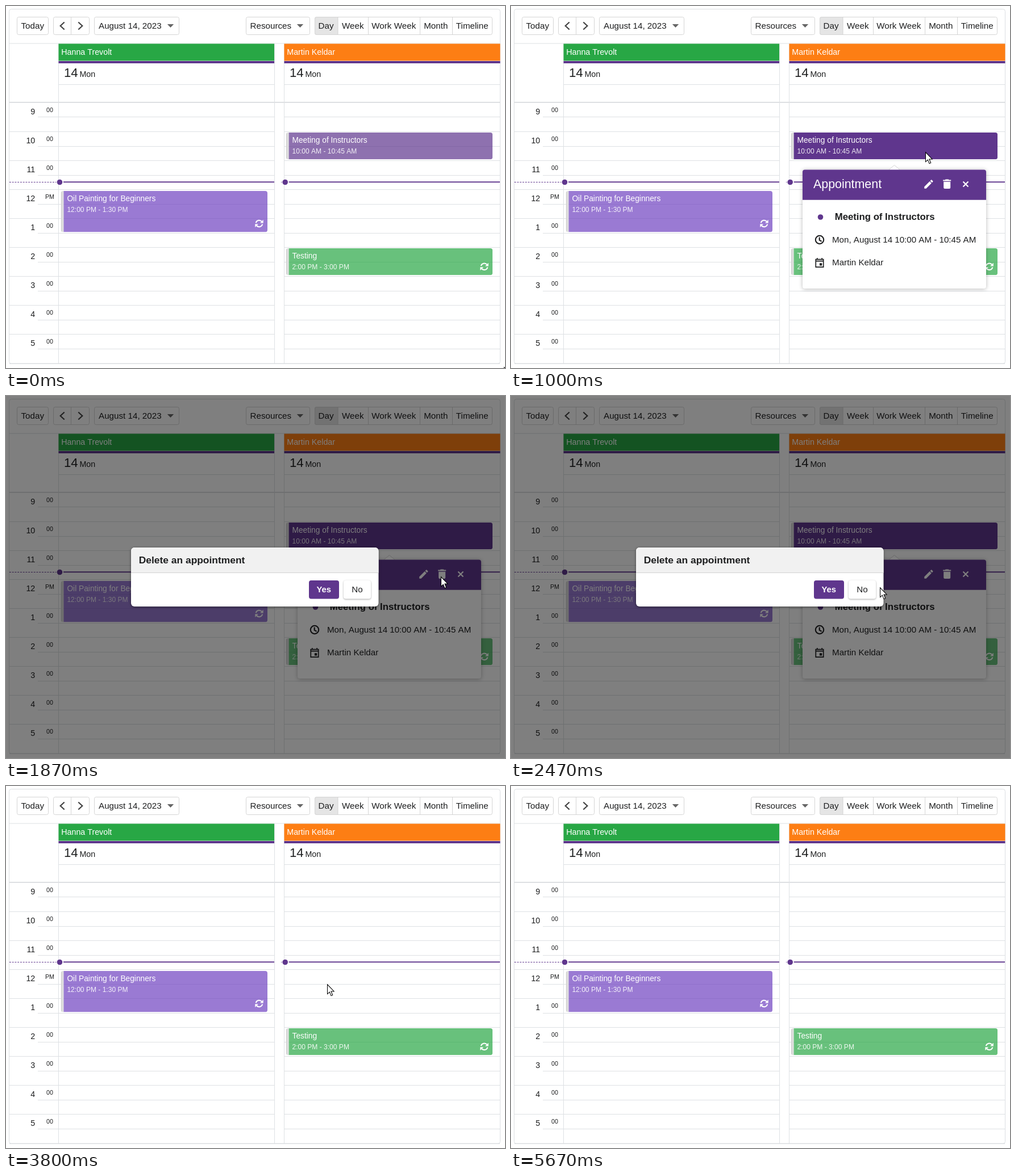
Write an HTML page with a canvas that moves like this. It is 878 by 638 pixels and loops after 6.67 s.

```html
<!DOCTYPE html>
<html lang="en">
<head>
<meta charset="utf-8">
<title>Scheduler</title>
<style>
html, body { margin: 0; width: 100%; height: 100%; overflow: hidden; background: #fff; }
canvas { display: block; }
</style>
</head>
<body>
<canvas id="stage" width="878" height="638"></canvas>
<script>
const ctx = document.getElementById('stage').getContext('2d');
const LOOP = 6670, TICK = 66.667;
const PURPLE = '#5f368d', GRID = '#dee1e4', INK = '#1e1f20';
const PEOPLE = ['Hanna Trevolt', 'Martin Keldar'];

function rect(x, y, w, h, color) {
  ctx.fillStyle = color;
  ctx.fillRect(x, y, w, h);
}

function box(x, y, w, h, radius, fill, stroke) {
  ctx.beginPath();
  ctx.roundRect(x, y, w, h, radius);
  if (fill) { ctx.fillStyle = fill; ctx.fill(); }
  if (stroke) { ctx.strokeStyle = stroke; ctx.lineWidth = 1; ctx.stroke(); }
}

function shadowed(blur, offset, color, draw) {
  ctx.save();
  ctx.shadowBlur = blur;
  ctx.shadowOffsetY = offset;
  ctx.shadowColor = color;
  draw();
  ctx.restore();
}

function text(str, x, y, size, color = INK, weight = 'normal', align = 'left') {
  ctx.font = `${weight} ${size}px "Liberation Sans", Arial, sans-serif`;
  ctx.textAlign = align;
  ctx.fillStyle = color;
  ctx.fillText(str, x, y);
}

function dot(x, y, r, color) {
  ctx.beginPath();
  ctx.arc(x, y, r, 0, 7);
  ctx.fillStyle = color;
  ctx.fill();
}

// Draws SVG path data at a position.
function shape(d, x, y, { fill, stroke, width = 1, scale = 1 }) {
  const path = new Path2D(d);
  ctx.save();
  ctx.translate(x, y);
  ctx.scale(scale, scale);
  if (fill) { ctx.fillStyle = fill; ctx.fill(path); }
  if (stroke) { ctx.strokeStyle = stroke; ctx.lineWidth = width; ctx.stroke(path); }
  ctx.restore();
}

function toolbar() {
  const border = '#d5d5d5', label = (s, x) => text(s, x, 40, 15.2);
  for (const [x, w] of [[19.5, 55], [83.5, 63], [155.5, 149], [422.5, 112], [543.5, 312]])
    box(x, 19.5, w, 31, 3, '#fff', border);
  box(543.5, 19.5, 40.5, 31, [3, 0, 0, 3], '#e5e5e5', border);
  for (const x of [114, 637, 728, 785]) rect(x, 20, 1, 30, border);
  label('Today', 26.5);
  label('August 14, 2023', 163);
  label('Resources', 429.5);
  label('Day', 549.5);
  label('Week', 591);
  label('Work Week', 643.3);
  label('Month', 735.2);
  label('Timeline', 791.8);
  shape('M4 -6.5L-3 0L4 6.5', 98.7, 35, { stroke: '#444', width: 2.2 });
  shape('M-4 -6.5L3 0L-4 6.5', 131.3, 35, { stroke: '#444', width: 2.2 });
  for (const x of [289.5, 517.5]) shape('M-5.7 -3H5.7L0 3Z', x, 35, { fill: '#666' });
}

function column(x, width, color, person) {
  rect(x, 66.5, width, 30, color);
  rect(x, 97, width, 4, PURPLE);
  text(person, x + 4.8, 86, 14.25, '#fff');
  text('14', x + 9.4, 125, 22.2);
  text('Mon', x + 36.9, 124.5, 14.25);
  rect(x, 138, width, 1, GRID);
}

function grid() {
  box(5.5, 5.5, 864, 625, 4, '#fff', '#dcdfe2');
  rect(6, 629.5, 863, 1.5, '#dcdfe2');
  rect(6, 65.5, 863, 1, GRID);
  for (let row = 1; row < 18; row++) {
    const y = Math.round(169.95 + row * 25.53), left = row % 2 ? 56 : 6;
    rect(left, y, 472 - left, 1, GRID);
    rect(490, y, 379, 1, GRID);
  }
  rect(6, 169, 863, 1.5, '#d3d6d9');
  for (const x of [92, 472, 489]) rect(x, 66, 1, 564, GRID);
  for (let i = 0; i < 9; i++) {
    const y = 191 + i * 51.03;
    text(String((i + 8) % 12 + 1), 51.3, y, 14.25, INK, 'normal', 'right');
    text(i === 3 ? 'PM' : '00', 77, y - 4.2, 10.7, INK, 'normal', 'center');
  }
  column(92.5, 379.5, '#28a745', PEOPLE[0]);
  column(489.5, 380, '#fd7e14', PEOPLE[1]);
}

function nowLine() {
  for (const [x, start, end] of [[94.5, 6, 472], [491.2, 484, 869]]) {
    ctx.strokeStyle = PURPLE;
    ctx.lineWidth = 1;
    ctx.setLineDash([2.85, 1.9]);
    ctx.beginPath();
    ctx.moveTo(start, 310.5);
    ctx.lineTo(x - 6, 310.5);
    ctx.stroke();
    ctx.setLineDash([]);
    rect(x + 6.5, 309.3, end - x - 6.5, 1.9, PURPLE);
    dot(x, 310.5, 4.8, PURPLE);
  }
}

function repeatIcon(x, y) {
  const half = 'M-5.8 -1.2A6 6 0 0 1 4.6 -3.6', tip = 'M7.2 -6.6V-.9H1.5Z';
  for (const turn of [0, Math.PI]) {
    ctx.save();
    ctx.translate(x, y);
    ctx.rotate(turn);
    shape(half, 0, 0, { stroke: '#fff', width: 2 });
    shape(tip, 0, 0, { fill: '#fff' });
    ctx.restore();
  }
}

function appointment(x, y, h, color, title, time, { alpha = 0.7, repeats = false } = {}) {
  const w = 363.3, strip = 4.6;
  ctx.save();
  ctx.beginPath();
  ctx.roundRect(x, y, w, h, 4);
  ctx.clip();
  ctx.globalAlpha = alpha;
  rect(x + strip, y, w - strip, h, color);
  ctx.globalAlpha = 1;
  rect(x, y, strip, h, '#dedede');
  rect(x, y, 1, h, '#c9c9c9');
  ctx.restore();
  text(title, x + 10.7, y + 17.7, 13.75, '#fff');
  text(time, x + 10.7, y + 36.6, 12.05, 'rgba(255,255,255,.88)');
  if (repeats) repeatIcon(x + w - 14.5, y + h - 15);
}

function popup() {
  shadowed(7, 1, 'rgba(0,0,0,.28)', () => box(513, 288, 323, 210, 4, '#fff'));
  shape('M-9.5 8L0 0L9.5 8', 674.5, 280.5, { fill: '#fff', stroke: '#d4d4d4' });
  box(513, 288.4, 323, 53.4, [4, 4, 0, 0], PURPLE);
  text('Appointment', 532, 321, 21.4, '#fff');
  const pencil = 'M3 17.2V21H6.8L17.8 9.9L14.1 6.2ZM20.7 7Q21.4 6.3 20.7 5.6L18.4 3.3Q17.7 2.6 17 3.3L15.1 5.1L18.9 8.9Z';
  shape(pencil, 724.7, 303.8, { fill: '#fff', scale: .85 });
  shape('M-7 -7.5H-3.5L-2.5 -8.5H2.5L3.5 -7.5H7V-5.5H-7ZM-6 -4.2H6V6Q6 8 4 8H-4Q-6 8 -6 6Z', 767.2, 314, { fill: '#fff' });
  shape('M-4.5 -4.5L4.5 4.5M4.5 -4.5L-4.5 4.5', 800, 314, { stroke: '#fff', width: 2.2 });

  dot(544.5, 372, 4.8, PURPLE);
  text('Meeting of Instructors', 569.7, 376.5, 16.75, INK, 'bold');
  shape('M7.2 0A7.2 7.2 0 1 1 -7.2 0A7.2 7.2 0 1 1 7.2 0M-.3 -4.6V.6L3.6 2.9', 543, 412, { stroke: INK, width: 2.1 });
  text('Mon, August 14 10:00 AM - 10:45 AM', 565, 417, 15.15);
  const calendar = 'M3 4H21V22H3ZM5 6V7.5H19V6ZM5 9.5V20H19V9.5ZM12 13H17V18H12ZM6 2H8V4H6ZM16 2H18V4H16Z';
  shape(calendar, 532.9, 442.4, { fill: INK, scale: .84 });
  text(PEOPLE[1], 565, 457, 15.2);
}

function dialog(hover) {
  rect(0, 0, 878, 638, 'rgba(0,0,0,.5)');
  shadowed(4, 1, 'rgba(0,0,0,.5)', () => box(220, 267, 435.5, 104, 6, '#fff'));
  box(220, 267, 435.5, 44, [6, 6, 0, 0], '#f1f1f1');
  rect(220, 311, 435.5, 1, '#d2d2d2');
  text('Delete an appointment', 233.8, 295, 17.4, INK, 'bold');
  box(533, 325, 53, 32.5, 4, hover ? '#512e78' : PURPLE);
  text('Yes', 559.3, 346, 14.8, '#fff', 'bold', 'center');
  shadowed(3, 1, 'rgba(0,0,0,.35)', () => box(594, 325, 48, 32.5, 4, '#fff'));
  text('No', 618, 346, 15.2, INK, 'normal', 'center');
}

const easeOut = p => 1 - (1 - p) ** 1.7;
const easeIn = p => p ** 1.5;
const easeBoth = p => p * p * (3 - 2 * p);

// Each move: first tick, last tick, start, bend, end, easing.
const MOVES = [
  [0, 8, [876, 636], [682, 400], [729, 257], easeOut],
  [15, 24, [729, 257], [733, 292], [758, 316], easeBoth],
  [24, 25, [758, 316], [762, 318], [765, 319], easeBoth],
  [27, 28, [765, 319], [765, 318], [765, 318], easeBoth],
  [32, 41, [765, 318], [660, 330], [573, 358], easeBoth],
  [43, 45, [573, 358], [568, 354], [565, 349], easeBoth],
  [78, 85, [565, 349], [350, 490], [105, 691], easeIn]
];

function cursor(tick) {
  const [first, last, from, bend, to, ease] = MOVES.filter(move => move[0] <= tick).pop();
  const p = ease(Math.min(1, (tick - first) / (last - first))), q = 1 - p;
  const [x, y] = from.map((v, i) => Math.round(v * q * q + 2 * bend[i] * p * q + to[i] * p * p));
  const pointing = tick >= 25 && tick < 28 || tick >= 41 && tick < 57;
  const style = { fill: '#fff', stroke: '#000', scale: 1.03 };
  if (pointing) {
    shape('M1.5 .5Q3.3 .5 3.3 2.5V8.6Q6.2 8 6.6 9.8Q9.4 9.2 9.8 11Q12.5 10.6 12.5 13.2V17.5Q12.5 19.5 11 21.3V23.5H2.3V21.5L-3.4 14.8Q-5 12.4 -3.4 11.5Q-2 11 -.3 13.5V2.5Q-.3 .5 1.5 .5Z', x, y, style);
    shape('M3.3 8.6V12.5M6.6 9.8V13M9.8 11V13.5', x, y, { stroke: '#000' });
  } else {
    shape('M.5 .8V17L4.2 13.6L6.8 20L9.4 18.9L6.8 12.6H11.8Z', x, y, style);
  }
}

function draw(time) {
  const tick = Math.floor((time % LOOP + 4) / TICK);
  rect(0, 0, 878, 638, '#fff');
  grid();
  toolbar();
  nowLine();
  appointment(96.7, 326, 72.4, '#6f42c1', 'Oil Painting for Beginners', '12:00 PM - 1:30 PM', { repeats: true });
  appointment(492.8, 427, 47.3, '#28a745', 'Testing', '2:00 PM - 3:00 PM', { repeats: true });
  if (tick < 57)
    appointment(492.8, 223, 47.3, PURPLE, 'Meeting of Instructors', '10:00 AM - 10:45 AM', { alpha: tick < 15 ? 0.7 : 1 });
  if (tick >= 15 && tick < 57) popup();
  if (tick >= 28 && tick < 57) dialog(tick >= 41);
  cursor(tick);
}

const start = performance.now();
function loop() {
  draw(performance.now() - start);
  requestAnimationFrame(loop);
}
loop();
</script>
</body>
</html>
```
